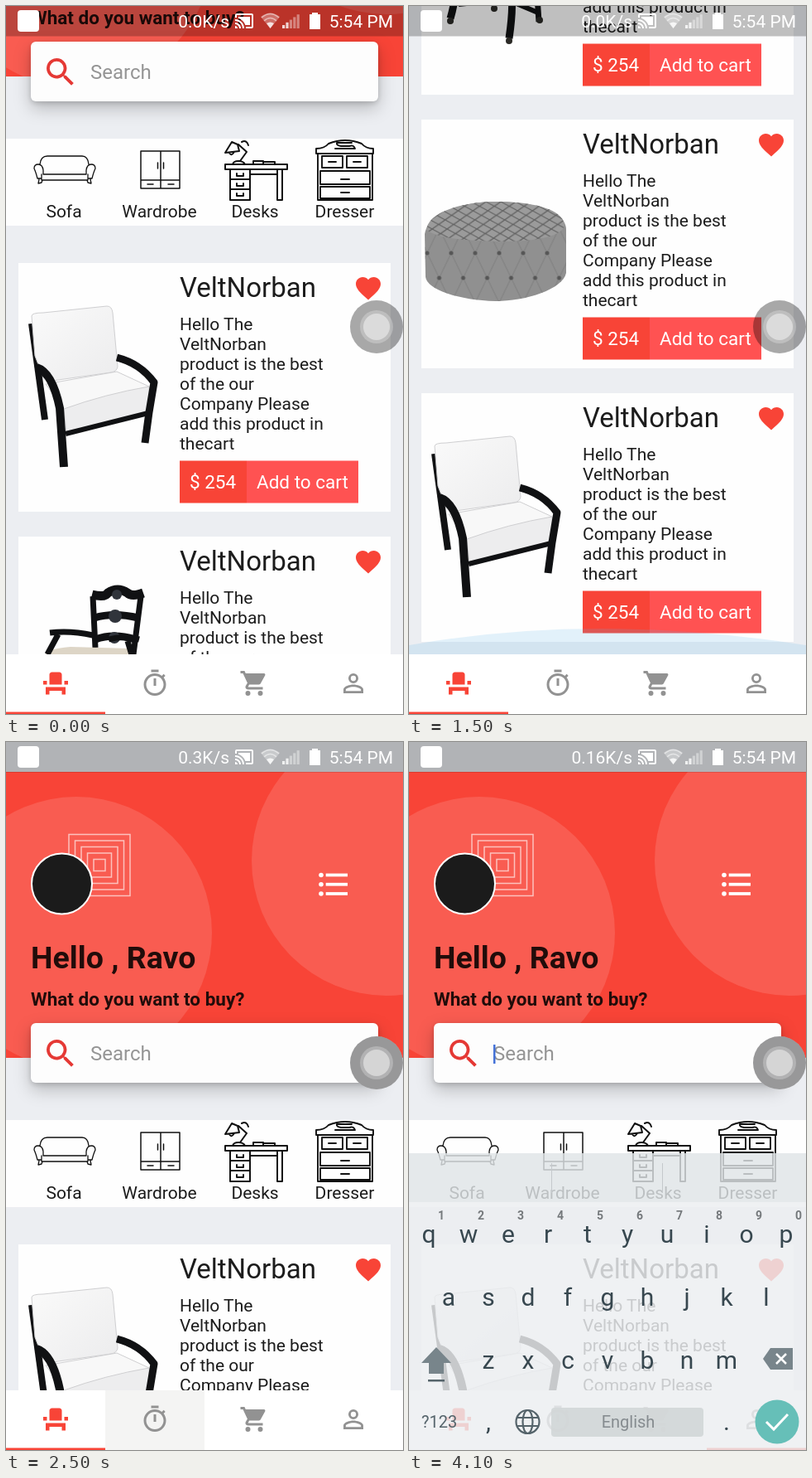
Animation of 480x854 px, one loop 4500 ms. Source, as an HTML page:

```html
<!DOCTYPE html>
<html lang="en">
<head>
<meta charset="utf-8">
<title>Furniture shop</title>
<style>
html, body { margin: 0; width: 100%; height: 100%; overflow: hidden; background: #eceef2 }
svg { display: block; width: 480px; height: 854px }
text { font: 21px Roboto, sans-serif; fill: #1c1c1c; white-space: pre }
.mid { text-anchor: middle }
.end { text-anchor: end }
.white, .white text { fill: #fff }
.line { fill: none; stroke: #111; stroke-linejoin: round; stroke-linecap: round }
.dark { fill: none; stroke: #101113; stroke-linejoin: round }
.key { font-size: 30px; fill: #37474f }
.hint { font-size: 14px; font-weight: bold; fill: #75797c }
#search { filter: drop-shadow(0 2px 3px rgba(0,0,0,.16)) drop-shadow(0 8px 10px rgba(0,0,0,.22)) }
</style>
</head>
<body>
<svg id="stage" viewBox="0 0 480 854"></svg>
<script>
const RED = '#f84437', GREY = '#929292';
const LOOP = 4500;
const STATES = [
  { until: 1000, scroll: 296, rate: '0.0K/s', tab: 0 },
  { until: 1500, scroll: 910, rate: '0.0K/s', tab: 0 },
  { until: 2500, scroll: 1129, rate: '0.0K/s', tab: 0, glow: true },
  { until: 3000, scroll: 0, rate: '0.3K/s', tab: 0, pressed: true },
  { until: 3500, scroll: 0, rate: '0.0K/s', tab: 3 },
  { until: 4500, scroll: 0, rate: '0.16K/s', tab: 3, typing: true }
];

const ICONS = {
  seat: 'M4 18v3h3v-3h10v3h3v-6H4zm15-8h3v3h-3zM2 10h3v3H2zm15 3H7V5c0-1.1.9-2 2-2h6c1.1 0 2 .9 2 2z',
  timer: 'M15 1H9v2h6zm-4 13h2V8h-2zm8.03-6.61l1.42-1.42c-.43-.51-.9-.99-1.41-1.41l-1.42 1.42C16.07 4.74 14.12 4 12 4c-4.97 0-9 4.03-9 9s4.02 9 9 9 9-4.03 9-9c0-2.12-.74-4.07-1.97-5.61zM12 20c-3.87 0-7-3.13-7-7s3.13-7 7-7 7 3.13 7 7-3.13 7-7 7z',
  cart: 'M7 18a2 2 0 1 0 0 4 2 2 0 0 0 0-4zM1 2v2h2l3.6 7.59-1.35 2.45C4.5 15.3 5.5 17 7 17h12v-2H7.42c-.2 0-.3-.2-.22-.37l.9-1.63h7.45c.75 0 1.41-.41 1.75-1.03l3.58-6.49C21.2 4.8 20.7 4 20 4H5.21l-.94-2zm16 16a2 2 0 1 0 0 4 2 2 0 0 0 0-4z',
  person: 'M12 5.9a2.1 2.1 0 1 1 0 4.2 2.1 2.1 0 0 1 0-4.2m0 9c2.97 0 6.1 1.46 6.1 2.1v1.1H5.9V17c0-.64 3.13-2.1 6.1-2.1M12 4a4 4 0 1 0 0 8 4 4 0 0 0 0-8zm0 9c-2.67 0-8 1.34-8 4v3h16v-3c0-2.66-5.33-4-8-4z',
  heart: 'M12 21.35l-1.45-1.32C5.4 15.36 2 12.28 2 8.5 2 5.42 4.42 3 7.5 3c1.74 0 3.41.81 4.5 2.09C13.09 3.81 14.76 3 16.5 3 19.58 3 22 5.42 22 8.5c0 3.78-3.4 6.86-8.55 11.54z',
  search: 'M15.5 14h-.79l-.28-.27a6.5 6.5 0 1 0-.7.7l.27.28v.79l5 4.99L20.49 19zm-6 0a4.5 4.5 0 1 1 0-9 4.5 4.5 0 0 1 0 9z',
  cast: 'M1 18v3h3c0-1.66-1.34-3-3-3zm0-4v2c2.76 0 5 2.24 5 5h2c0-3.87-3.13-7-7-7zm18-7H5v1.63c3.96 1.28 7.09 4.41 8.37 8.37H19zM1 10v2c4.97 0 9 4.03 9 9h2c0-6.08-4.93-11-11-11zm20-7H3c-1.1 0-2 .9-2 2v3h2V5h18v14h-7v2h7c1.1 0 2-.9 2-2V5c0-1.1-.9-2-2-2z'
};

const icon = (name, x, y, scale, fill) =>
  `<path d="${ICONS[name]}" transform="translate(${x} ${y}) scale(${scale})" fill="${fill}" fill-rule="evenodd"/>`;
const rect = (x, y, w, h, fill, extra = '') =>
  `<rect x="${x}" y="${y}" width="${w}" height="${h}" fill="${fill}" ${extra}/>`;
const circle = (x, y, r, fill, extra = '') =>
  `<circle cx="${x}" cy="${y}" r="${r}" fill="${fill}" ${extra}/>`;
const shape = (d, fill) => `<path d="${d}" fill="${fill}"/>`;
const text = (x, y, str, size = 21, cls = '', extra = '') =>
  `<text x="${x}" y="${y}" class="${cls}" style="font-size:${size}px;${extra}">${str}</text>`;
const dark = (width, d) => `<path class="dark" stroke-width="${width}" d="${d}"/>`;
const line = (width, d) => `<path class="line" stroke-width="${width}" d="${d}"/>`;
const range = (n, fn) => Array.from({ length: n }, (_, i) => fn(i)).join('');

const armchair = `
  ${dark(8, 'M31 73L47 189')}
  <g stroke="#cfcfd1" stroke-width="1">
    ${shape('M31 64Q31 60 45 60L122 52Q128 52 129 60L135 125Q134 131 127 132L56 142Q47 143 45 138L35 112Z', 'url(#cushion)')}
    ${shape('M48 146L134 131L173 149L71 177Z', '#f8f8f8')}
    ${shape('M70 176Q120 158 173 149L174 179L73 204Z', '#ededee')}
  </g>
  ${dark(6, 'M72 206L172 181')}
  ${dark(10, 'M37 126Q56 132 65 175L70 246')}
  ${dark(9, 'M134 114Q162 121 179 144L173 180L168 217')}`;

const ladderChair = `
  ${dark(6, 'M103 152V194M60 191L118 185L156 201')}
  ${dark(7, 'M105 72L108 134M163 72L153 150L157 212')}
  ${dark(11, 'M104 70Q120 74 123 68Q135 60 147 68Q152 73 166 68')}
  ${dark(9, 'M107 98Q130 91 160 98M108 124Q130 116 156 124')}
  ${circle(134, 70, 6, '#30343b')}${circle(132, 96, 8, '#30343b')}${circle(131, 122, 7, '#30343b')}
  ${shape('M48 143Q46 136 78 133L150 135Q157 140 153 151L118 162L54 155Z', '#ddd5c6')}
  ${dark(7, 'M53 116Q78 113 105 119M63 118L50 142M124 124Q142 119 161 124M147 126L153 146')}
  ${dark(9, 'M50 154L118 163L154 151')}
  ${dark(9, 'M52 154Q60 174 50 208M119 163Q129 178 121 232')}
  ${[[50, 211], [121, 235], [158, 210], [103, 196]].map(([x, y]) => circle(x, y, 4, '#2b2a26')).join('')}`;

const DRUM = 'M19 138C24 108 75 99 105 99C150 99 190 110 190 133V185C186 205 140 219 105 219C60 218 22 205 20 190Z';
const LID = 'M21 133C24 108 75 99 105 99C150 99 187 108 188 128C184 142 150 147 110 147C70 146 36 144 21 133Z';
const ottoman = shape(DRUM, '#909090') + shape(DRUM, 'url(#sideTuft)') + shape(LID, '#9b9b9b') + shape(LID, 'url(#topTuft)');

const BLURB = ['Hello The', 'VeltNorban', 'product is the best', 'of the our', 'Company Please', 'add this product in', 'thecart'];
const card = (photo, i) => `<g transform="translate(0 ${606 + 330 * i})">
  ${rect(15, 0, 450, 300, '#fefefe')}${photo}
  ${text(210, 41, 'VeltNorban', 33)}
  ${icon('heart', 420, 12.5, 1.5, RED)}
  ${BLURB.map((str, n) => text(210, 80.5 + 24 * n, str)).join('')}
  ${rect(210, 238.5, 81, 51, RED)}${rect(291, 238.5, 135, 51, '#ff5252')}
  ${text(222, 272, '$ 254', 22.5, 'white')}${text(303, 272, 'Add to cart', 22.5, 'white')}</g>`;

const header = `
  <clipPath id="banner"><rect y="36" width="480" height="345"/></clipPath>
  <g clip-path="url(#banner)">${rect(0, 36, 480, 345, RED)}
    ${circle(85, 230, 164, '#fff', 'opacity=".13"')}${circle(460, 143, 163, '#fff', 'opacity=".13"')}</g>
  ${range(5, i => rect(76 + 7.5 * i, 111.5 + 7.5 * i, 74 - 15 * i, 74 - 15 * i, 'none', 'stroke="#fff" stroke-width="1.5" opacity=".62"'))}
  ${circle(67.5, 171, 36.5, '#1b1b1b', 'stroke="#fff" stroke-width="2"')}
  ${range(3, i => circle(381, 160.5 + 11.25 * i, 2.8, '#fff') + rect(386.7, 158.6 + 11.25 * i, 26.3, 3.75, '#fff'))}
  ${text(30, 273, 'Hello , Ravo', 37.5, '', 'font-weight:bold;fill:#210c0a')}
  ${text(30, 318, 'What do you want to buy?', 22.5, '', 'font-weight:bold;fill:#210c0a')}
  ${rect(30, 339, 420, 72, '#fdfdfd', 'rx="6" id="search"')}
  ${icon('search', 43.4, 353.4, 1.875, '#e53935')}
  ${text(102, 384, 'Search', 24, '', 'fill:#959595')}`;

const categories = rect(0, 456, 480, 105, '#fefefe')
  + line(1.3, 'M41 487Q42 477 50 477H92Q99 477 100 487M43 504h-5q-2-8-4-12 0-5 5-5 5 0 6 7v5h52v-5q1-7 6-7 5 0 5 5-2 4-4 12h-5M43 499v7h56v-7M40 505l-1 5 4-1 1-3M102 505l1 5-4-1-1-3')
  + line(1.5, 'M163 471h47v45h-47zM163 506h47M187 471v45M183.5 485v7M190.5 485v7M171 511h7M196 511h7')
  + line(2, 'M265 487h75v6h-75zM271 493v37h24v-37M271 505h24M271 517h24M279 498v3h8v-3M279 510v3h8v-3M279 522v3h8v-3M295 499h33M328 493v37h6v-37M274 487q1-4 7-4t8 4M283 483l8-11-10-9M265 473l8-13 7 3 2 8zM270 473q2 5 6-1M285 460q6-3 8 4M299 487v-4h12v4M311 484h14v3')
  + line(1.9, 'M377 474v56h66v-56M375 474v-6q10 0 15-6 20-8 40 0 5 6 14 6v6zM382 477h25v14h-25zM412 477h25v14h-25zM380 495h60v16h-60zM380 514h60v14h-60zM390 484h9M420 484h9M405 505h10M405 521h10M398 468h24q-2-5-7-3h-10q-6-1-5-4h18')
  + [[70, 'Sofa'], [185.5, 'Wardrobe'], [301, 'Desks'], [409.5, 'Dresser']].map(([x, name]) => text(x, 551, name, 21, 'mid')).join('');

const nav = rect(0, 782, 480, 72, '#fff')
  + rect(120, 782, 120, 72, '#f4f4f3', 'id="pressed"')
  + ['seat', 'timer', 'cart', 'person'].map((name, i) => icon(name, 42 + 120 * i, 799, 1.5, i ? GREY : RED)).join('')
  + rect(0, 851.5, 120, 2.5, RED, 'id="underline"');

const statusBar = `<g class="white">${rect(0, 0, 480, 36.5, '#000', 'opacity=".25"')}
  ${rect(14, 5, 26, 26, '#fff', 'rx="4"')}
  <text id="rate" x="270" y="26" class="end"></text>
  ${icon('cast', 276, 6, 1, '#fff')}
  <path d="M319.5 27L308 13Q319.5 4 331 13Z" opacity=".3"/>
  <path d="M319.5 27L315 21Q319.5 18 324 21Z" opacity=".8"/>
  <path d="M309 14Q319.5 5 330 14M312 18Q319.5 11 327 18" fill="none" stroke="#fff" stroke-width="1.6" opacity=".5"/>
  ${range(5, i => rect(334 + 4.4 * i, 23 - 3.2 * i, 3.2, 4 + 3.2 * i, '#fff', `opacity="${i < 2 ? 0.8 : 0.4}"`))}
  ${rect(367, 10, 13, 18, '#fff')}${rect(370, 8, 7, 2, '#fff')}
  ${text(468, 26, '5:54 PM', 21, 'end')}</g>`;

const touchDot = circle(448, 387, 32, '#e6e6e8', 'id="dotBase"') + circle(448, 387, 32, '#000', 'opacity=".34"')
  + circle(448, 387, 20, '#fff', 'opacity=".25"') + circle(448, 387, 16, '#fff', 'opacity=".45"');

const keyRow = (letters, x, y) =>
  [...letters].map((c, i) => `<text class="key mid" x="${x + 48 * i}" y="${y}">${c}</text>`).join('');
const keyboard = `<g id="keyboard">
  ${rect(102, 365, 2.5, 23, '#4472d8')}
  ${rect(0, 496, 480, 59, '#e0e4e7', 'opacity=".82"')}${rect(0, 555, 480, 299, '#eceff1', 'opacity=".83"')}
  ${rect(172, 508, 1, 36, '#c5c9cc')}${rect(306, 508, 1, 36, '#c5c9cc')}
  ${keyRow('qwertyuiop', 24, 604)}${keyRow('asdfghjkl', 48, 680)}${keyRow('zxcvbnm', 96, 756)}
  ${[...'1234567890'].map((c, i) => `<text class="hint mid" x="${39 + 48 * i}" y="576">${c}</text>`).join('')}
  ${shape('M33 730L51 749H42V762H24V749H15Z', '#78858b')}${rect(23, 769, 20, 2.5, '#55646b')}
  ${shape('M428 744L437 731H464V757H437Z', '#78858b')}
  <path d="M444 738L456 750M456 738L444 750" stroke="#fff" stroke-width="2.5"/>
  ${text(15, 827, '?123', 20, '', 'fill:#55646b')}
  ${keyRow(',', 96, 830)}${keyRow('.', 384, 830)}
  <g fill="none" stroke="#55646b" stroke-width="2.2"><circle cx="143.5" cy="820" r="14"/>
    <ellipse cx="143.5" cy="820" rx="6" ry="14"/><path d="M131 815H156M131 825H156"/></g>
  ${rect(172, 803, 184, 35, '#d2d6d8', 'rx="4" opacity=".9"')}
  ${text(265, 827, 'English', 20, 'mid', 'fill:#858b8f')}
  ${circle(445, 820, 26.5, '#66bfb8')}
  <path d="M432 820L441 829L458 811" fill="none" stroke="#fff" stroke-width="3"/></g>`;

const defs = `<defs>
  <linearGradient id="cushion" x2="1" y2="1"><stop stop-color="#fafafa"/><stop offset="1" stop-color="#ececed"/></linearGradient>
  <pattern id="topTuft" width="18" height="11" patternUnits="userSpaceOnUse" patternTransform="skewX(12)">
    <path d="M0 0L18 11M18 0L0 11" stroke="#626262" stroke-width="1.3"/></pattern>
  <pattern id="sideTuft" x="36.5" y="146" width="29" height="60" patternUnits="userSpaceOnUse">
    <path d="M0 -15L14.5 15L0 45L14.5 75M29 -15L14.5 15L29 45L14.5 75" fill="none" stroke="#7d7d7d"/>
    <g fill="#565656"><circle cx="14.5" cy="15" r="2.5"/><circle cy="45" r="2.5"/><circle cx="29" cy="45" r="2.5"/></g></pattern>
</defs>`;

const stage = document.getElementById('stage');
stage.innerHTML = defs + rect(0, 0, 480, 854, '#eceef2')
  + `<g id="list">${header}${categories}${[armchair, ladderChair, ottoman, armchair].map(card).join('')}</g>`
  + '<path id="glow" d="M0 771Q225 731 480 771V782H0Z" fill="#58b0e4" opacity=".17"/>'
  + nav + statusBar + keyboard + touchDot;

const [list, glow, pressed, underline, rate, keys, dotBase] =
  ['list', 'glow', 'pressed', 'underline', 'rate', 'keyboard', 'dotBase'].map(id => document.getElementById(id));
const show = (el, on) => el.setAttribute('visibility', on ? 'visible' : 'hidden');

function draw() {
  const time = performance.now() % LOOP;
  const state = STATES.find(s => time < s.until);
  list.setAttribute('transform', `translate(0 ${-state.scroll})`);
  underline.setAttribute('x', 120 * state.tab);
  rate.textContent = state.rate;
  show(glow, state.glow);
  show(pressed, state.pressed);
  show(keys, state.typing);
  show(dotBase, state.scroll === 0);
  requestAnimationFrame(draw);
}
draw();
</script>
</body>
</html>
```
